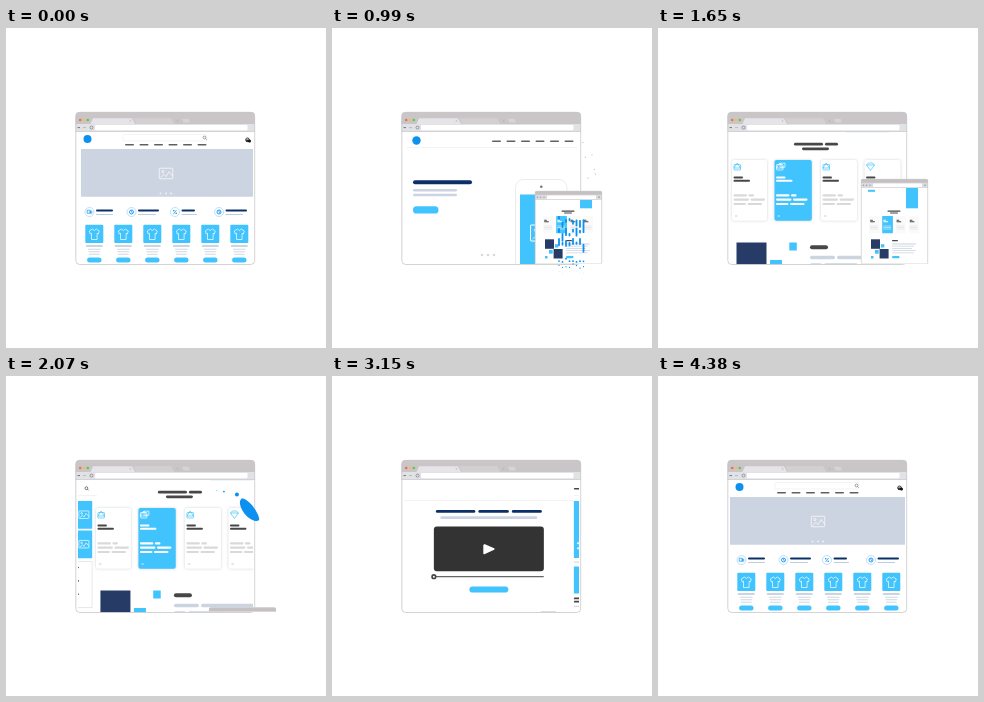
Recreate the animation shown at these times as an HTML page with a canvas. Size 320x320 px, loop 4410 ms.

```html
<!DOCTYPE html>
<html lang="en">
<head>
<meta charset="utf-8">
<title>Website builder</title>
<style>
html, body { margin: 0; width: 100%; height: 100%; overflow: hidden; background: #fff; }
canvas { display: block; width: 320px; height: 320px; }
</style>
</head>
<body>
<canvas id="stage"></canvas>
<script>
const LOOP = 4410, STEP = 30, SHIFT = 170, SCROLL = 132;
const SKY = '#41c3fd', BLUE = '#0c91f0', NAVY = '#0b3068', DARK = '#474747',
      PALE = '#cbd4e0', GREY = '#d9d9d9', INK = '#263c66';
const canvas = document.getElementById('stage');
const c = canvas.getContext('2d');
const scale = window.devicePixelRatio || 1;
canvas.width = canvas.height = 320 * scale;

const progress = (t, start, dur) => Math.min(1, Math.max(0, (t - start) / dur));
const inOut = u => u < .5 ? 4 * u ** 3 : 1 - 4 * (1 - u) ** 3;
const out = u => 1 - (1 - u) ** 3;

function randomizer(seed) {
  return () => (seed = (seed * 16807) % 2147483647) / 2147483647;
}

// Drawing helpers
function box(x, y, w, h, color, r = 0) {
  c.fillStyle = color;
  c.beginPath();
  c.roundRect(x, y, w, h, r);
  c.fill();
}
function frame(x, y, w, h, color, r = 0, width = .7) {
  c.strokeStyle = color;
  c.lineWidth = width;
  c.beginPath();
  c.roundRect(x, y, w, h, r);
  c.stroke();
}
function bar(x1, x2, y, h, color) {
  box(x1, y - h / 2, x2 - x1, h, color, h / 2);
}
function dot(x, y, r, color) {
  c.fillStyle = color;
  c.beginPath();
  c.arc(x, y, r, 0, 7);
  c.fill();
}
function ring(x, y, r, color, width = .7) {
  c.strokeStyle = color;
  c.lineWidth = width;
  c.beginPath();
  c.arc(x, y, r, 0, 7);
  c.stroke();
}
function poly(points, color, fill, width = .7) {
  c.beginPath();
  points.forEach(([x, y]) => c.lineTo(x, y));
  c.fillStyle = c.strokeStyle = color;
  c.lineWidth = width;
  fill ? c.fill() : c.stroke();
}
function clipped(x, y, w, h, draw) {
  if (h <= 0) return;
  c.save();
  c.beginPath();
  c.rect(x, y, w, h);
  c.clip();
  draw();
  c.restore();
}
function moved(dx, dy, draw) {
  c.save();
  c.translate(dx, dy);
  draw();
  c.restore();
}
function picture(x, y, w, h) {
  const l = x - w / 2, b = y + h / 2;
  frame(l, y - h / 2, w, h, '#fff', .5, w > 16 ? 1 : .7);
  ring(l + w * .27, y - h * .18, w * .08, '#fff');
  poly([[l + w * .1, b - h * .12], [l + w * .35, y + h * .08], [l + w * .5, b - h * .2],
        [l + w * .72, y - h * .18], [l + w, y + h * .25]], '#fff');
}
function search(x, y, color) {
  ring(x, y, 1.4, color);
  poly([[x + 1, y + 1], [x + 2.2, y + 2.2]], color);
}
function nav(x, y, count, color = '#5c625f') {
  for (let i = 0; i < count; i++) bar(x + i * 14.5, x + i * 14.5 + 9, y, 1.5, color);
}
const rule = y => box(75, y, 170, .6, '#e8e8e8');

// Pages
function shirt(x, y) {
  poly([[x - 2, y - 5], [x, y - 3.5], [x + 2, y - 5], [x + 5, y - 3], [x + 4, y], [x + 2.8, y - .7],
        [x + 2.8, y + 5.5], [x - 2.8, y + 5.5], [x - 2.8, y - .7], [x - 4, y], [x - 5, y - 3],
        [x - 2, y - 5]], '#fff');
}
function shop(t) {
  dot(81.5, 111, 4, BLUE);
  frame(117, 106.5, 84, 6.5, '#f0f0f0', 1);
  search(198.5, 109.5, '#777');
  nav(119, 116.7, 6);
  ring(241.5, 111.8, 1.8, '#222', .9);
  box(240, 111.5, 3.2, 2.5, '#333', .5);
  dot(243.5, 113, 1.5, '#111');
  const left = t > LOOP / 2 ? 72 : 75;
  box(left, 121, 247 - left, 47.7, PALE);
  picture(160, 145.5, 13.5, 10.5);
  for (const x of [154.5, 160, 165]) dot(x, 165.5, 1, '#edf1f6');

  [[83.5, 107, 107], [125.5, 153, 150], [169, 189, 191], [213, 241, 237]].forEach(([x, end, sub], i) => {
    ring(x, 184, 4.5, '#8fcdf5', .6);
    if (i === 0) {
      frame(x - 2.3, 182.2, 3, 3, BLUE);
      frame(x + .7, 183.2, 1.6, 2, BLUE);
    } else if (i === 2) {
      poly([[x + 1.5, 182], [x - 1.5, 186]], BLUE);
      dot(x - 1.2, 182.7, .8, BLUE);
      dot(x + 1.2, 185.3, .8, BLUE);
    } else {
      ring(x, 184, 2, BLUE, .9);
      poly([[x, 182.5], [x, 184], [x + 1, 185]], BLUE);
    }
    bar(x + 6.5, end, 182.5, 2, NAVY);
    bar(x + 6.5, sub, 186.5, 1.2, '#bdcddd');
  });
  for (let i = 0; i < 6; i++) {
    const x = 88.3 + i * 29;
    box(x - 9, 196.7, 18, 18.3, SKY, 1);
    shirt(x, 206);
    bar(x - 8.5, x + 8.5, 218, 1.3, '#b6c9da');
    [221.3, 223.7, 226.2].forEach((y, n) => bar(x - 6.5 + n / 2, x + 6.5 - n / 2, y, .9, '#cfd8e2'));
    box(x - 7.2, 229.4, 14.4, 5, SKY, 2.5);
  }
}

function landing() {
  dot(84.5, 112.5, 4.2, BLUE);
  nav(160, 113.2, 6);
  rule(119);
  bar(81, 140, 154.2, 4, NAVY);
  bar(81, 125, 162.2, 2.4, PALE);
  bar(81, 125, 167, 2.4, PALE);
  box(81, 178.3, 25.5, 7.2, SKY, 3.6);
  for (const x of [150, 156, 162]) dot(x, 227, 1.3, '#dadada');
  clipped(72, 104, 175, 132, () => {
    frame(183.5, 151.5, 51.5, 100, '#e2e2e2', 8);
    dot(209.3, 158.7, 1.3, '#777');
    box(188, 166.5, 43, 70, SKY);
    picture(209, 205, 21, 16);
  });
}

function card(x, w, active, kind) {
  c.save();
  c.shadowColor = 'rgba(0,0,0,.18)';
  c.shadowBlur = 3 * scale;
  box(x, 132, w, 60.7, active ? SKY : '#fff', 2);
  c.restore();
  const ink = active ? '#fff' : DARK, soft = active ? '#fff' : GREY, icon = active ? '#fff' : SKY;
  const l = x + 2;
  if (kind === 3) {
    poly([[l, 137], [l + 2, 135], [l + 6, 135], [l + 8, 137], [l + 4, 142.5], [l, 137], [l + 8, 137]], icon);
  } else {
    frame(l, 136.5, 6.5, 5.5, icon, .5);
    poly([[l, 140], [l + 3.2, 135], [l + 6.5, 140], [l, 140]], icon);
    if (kind === 1) frame(l + 3.5, 135.2, 5, 4, icon);
  }
  bar(x + 1.5, x + 11, 149.4, 2, ink);
  bar(x + 1.5, x + 18, 152.7, 2, ink);
  [[167.4, 15, 22], [171.6, 17, 33], [176, 14, 30]].forEach(([y, a, b]) => {
    bar(x + 1.5, x + a, y, 2.1, soft);
    bar(x + a + 1.5, x + b, y, 2.1, soft);
  });
  poly([[x + 3, 188], [x + 5.5, 188]], active ? '#fff' : '#bbb');
}
function cards() {
  bar(136, 165, 116.2, 2.8, DARK);
  bar(167, 180, 116.2, 2.8, DARK);
  bar(144, 171, 120.8, 2.8, DARK);
  [[74, 35], [116.5, 37.3], [163, 36], [206.5, 36]].forEach(([x, w], i) => card(x, w, i === 1, i));
  box(78.5, 214.5, 30, 30, INK);
  box(131.3, 214.5, 7.5, 8, SKY);
  box(112, 232, 12, 12, SKY);
  bar(152, 170, 219.3, 4, DARK);
  bar(152, 177, 229.5, 3.4, PALE);
  bar(179, 235, 229.5, 3.4, PALE);
  bar(152, 164, 237, 3.4, PALE);
  bar(166, 200, 237, 3.4, PALE);
}
function scrollPage(t) {
  const y = SCROLL * inOut(progress(t, 1110, 510));
  if (y < SCROLL) moved(0, -y, landing);
  else box(188, 103.8, 43, .6, '#cfeaf3');
  if (y) moved(0, SCROLL - y, cards);
}

function caption(x, y) {
  [[0, 15], [16, 22], [24, 36]].forEach(([a, b]) => bar(x + a, x + b, y, 1.7, DARK));
  [[0, 11], [12, 25]].forEach(([a, b]) => bar(x + a, x + b, y + 3.2, 1.7, DARK));
}
function news() {
  nav(75, 112.7, 4, DARK);
  dot(158.6, 112.7, 5, BLUE);
  search(234.5, 112.2, '#444');
  rule(119);
  box(75, 125, 113.7, 57, SKY);
  picture(133.5, 148, 20.5, 15);
  bar(78, 105, 167.3, 2, '#d9f3ff');
  bar(107, 128, 167.3, 2, '#d9f3ff');
  bar(78, 109, 172.3, 2, '#d9f3ff');
  for (const y of [125, 154.5]) {
    box(191, y, 49.3, 27.8, SKY);
    picture(232, y + 13.7, 10, 7.5);
    bar(194.5, 203, y + 18.5, 1.6, '#fff');
    bar(204.5, 216, y + 18.5, 1.6, '#fff');
    bar(194.5, 211, y + 23, 1.6, '#fff');
  }
  bar(75, 84, 186.2, 1.2, GREY);
  for (let i = 0; i < 3; i++) {
    const x = 75 + i * 39.2;
    box(x, 190.6, 36, 26.8, SKY);
    picture(x + 18, 204, 12.5, 9.5);
    caption(x, 222.4);
    bar(x, x + 14, 230.3, 1.3, GREY);
  }
  frame(192.7, 185.5, 47.5, 46, '#dedede');
  bar(196, 209, 186.2, 1.6, DARK);
  for (let i = 0; i < 3; i++) {
    const y = 191.5 + i * 13.4;
    bar(197.5, 210, y, 1.6, DARK);
    bar(211, 227, y, 1.6, DARK);
    bar(197.5, 220, y + 2.8, 1.6, DARK);
    bar(197.5, 209, y + 6.5, 1, GREY);
  }
}

function video(t) {
  const u = out(progress(t, 3270, 390));
  bar(82, 82 + 29 * u, 116.4, 2, '#1aa0f3');
  bar(238 - 28.5 * u, 238, 114.4, 1.8, '#1aa0f3');
  bar(238 - 18 * u, 238, 117.9, 1.8, '#1aa0f3');
  rule(124.2);
  bar(107, 146.5, 135.4, 2.7, NAVY);
  bar(149.5, 180, 135.4, 2.7, NAVY);
  bar(183, 213, 135.4, 2.7, NAVY);
  bar(111.5, 208.5, 141.6, 2.7, PALE);
  box(105, 150.5, 110, 44.8, '#333', 3);
  c.lineJoin = 'round';
  const play = [[155.2, 168.7], [165, 173], [155.2, 177.5], [155.2, 168.7]];
  poly(play, '#fff', true);
  poly(play, '#fff', false, 1.5);
  bar(105, 215, 200.7, 1.3, '#666');
  const knob = 105 + 13.3 * progress(t, 3300, 450);
  dot(knob, 200.7, 2.6, '#444');
  dot(knob, 200.7, 1, '#fff');
  box(140.5, 210.4, 39, 6.2, SKY, 3.1);
  box(212, 235.2, 15, .8, '#d5d2d3');
}

// Window chrome
function browser() {
  box(69.5, 84, 179.5, 152.7, '#fff', 4);
  box(69.5, 84, 179.5, 14, '#cac5c6', [4, 4, 0, 0]);
  poly([[84.5, 96], [87, 90.3], [126, 90.3], [129, 96]], '#e6e4e8', true);
  poly([[130, 96], [127.5, 90.3], [165, 90.3], [168.5, 96]], '#d4d0d1', true);
  poly([[177.5, 94.5], [176, 90.7], [182.5, 90.7], [184, 94.5]], '#d8d4d5', true);
  ['#ed6d62', '#f2c251', '#62c35e'].forEach((color, i) => dot(74.2 + i * 3.8, 92, 1.3, color));
  for (const x of [124.5, 171.5]) {
    poly([[x - .8, 92], [x + .8, 93.6]], '#aaa', false, .5);
    poly([[x + .8, 92], [x - .8, 93.6]], '#aaa', false, .5);
  }
  box(69.5, 96, 179.5, 7.7, '#e1e2e5');
  box(89, 97, 152.5, 5.3, '#fff', 1);
  poly([[74, 99.6], [71.5, 99.6]], '#777', false, 1);
  poly([[77, 99.6], [80, 99.6]], '#bbb', false, 1);
  ring(85.5, 99.6, 1.5, '#778');
  box(69.5, 103.3, 179.5, .8, '#cdcdcf');
}
function miniWindow(x, w, top, draw) {
  if (top > 235.8) return;
  clipped(x - 1, top - 1, w + 2, 237 - top, () => {
    box(x, top, w, 240 - top, '#fff', 1.5);
    box(x, top, w, 4, '#c5c0c1', [1.5, 1.5, 0, 0]);
    box(x, top + 3.7, w, 5.3, '#dbdbde');
    box(x + 12, top + 4.5, w - 18, 3.5, '#fff', .5);
    [2.5, 5.5, 9].forEach(dx => dot(x + dx, top + 6.2, .7, '#99a'));
    dot(x + w - 3, top + 6.2, .8, '#99a');
    clipped(x, top + 9, w, 227 - top, draw);
    frame(x + .3, top + .3, w - .6, 235.7 - top, '#c9c9cb', 1.5);
  });
}
function miniCards() {
  box(210, 161.8, 7, 2, SKY);
  box(248, 155, 12, 25.3, SKY);
  bar(229.5, 242.5, 183.2, 1.2, DARK);
  bar(232, 240, 184.9, 1, DARK);
  for (let i = 0; i < 4; i++) {
    const x = 211 + i * 13.2, on = i === 1;
    box(x, 188, 10.7, 17.3, on ? SKY : '#fafafa', .5);
    bar(x + 1, x + 4, 192.3, .9, on ? '#fff' : DARK);
    bar(x + 1, x + 6, 193.8, .9, on ? '#fff' : DARK);
    for (const y of [198, 199.5, 201]) bar(x + 1, x + 9, y, .6, on ? '#fff' : GREY);
  }
  box(213, 211.3, 9, 9.5, INK);
  box(221.6, 221, 9, 9.5, INK);
  box(223, 216.2, 3.3, 3.3, SKY);
  box(217, 222, 3.7, 3.7, SKY);
  box(213, 228, 2.5, 2.5, SKY);
  bar(234, 240, 212.7, 1.3, DARK);
  for (let i = 0; i < 5; i++) bar(234, 258 - (i % 3) * 2, 216 + i * 2.2, .8, PALE);
  box(234, 228, 7.5, 2.2, SKY, 1);
}
function miniNews() {
  box(212.3, 170, 34.7, 17, SKY);
  caption(212, 190);
  bar(212, 225, 197, 1, GREY);
  box(212.3, 200, 34.7, 26, SKY);
  picture(229.5, 213, 12.5, 9.5);
  caption(212, 228.6);
}

// Paint effects
function burst(t, start, dur, x, y, reach, count, seed) {
  const u = progress(t, start, dur);
  if (u <= 0 || u >= 1) return;
  const rnd = randomizer(seed);
  for (let i = 0; i < count; i++) {
    const a = rnd() * 6.283, d = reach * (.15 + .85 * rnd()) * out(u), r = .6 + 1.5 * rnd();
    dot(x + d * Math.cos(a), y + d * Math.sin(a) * .8 + 6 * u * u, r * (1 - u * u), BLUE);
  }
}
function drips(t) {
  const u = progress(t, 810, 330);
  if (u <= 0 || u >= 1) return;
  const rnd = randomizer(77), grow = Math.sin(u * Math.PI);
  for (let i = 0; i < 8; i++) {
    const x = 227 + i * 3.5;
    for (let k = 0; k < 3; k++) {
      const y = 188 + k * 11 + rnd() * 6 + 10 * (u - .55), h = (3 + 6 * rnd()) * grow;
      box(x - .9, y, 1.8, h, BLUE, .9);
    }
    for (let k = 0; k < 3; k++) {
      dot(x, 230 + k * 6 + rnd() * 5 + 10 * (u - .55), (.9 - k * .25) * grow, k < 2 ? BLUE : '#a9dcf8');
    }
  }
  for (let i = 0; i < 6; i++) dot(246 + rnd() * 22, 114 + rnd() * 42, .7 * grow, '#b5cedb');
}
function flyingDrop(t) {
  const u = progress(t, 1962, 400);
  if (u <= 0 || u >= 1) return;
  const v = 1 - u;
  const x = v * v * 264 + 2 * u * v * 230 + u * u * 158.6;
  const y = v * v * 165 + 2 * u * v * 95 + u * u * 112.7;
  const angle = Math.atan2(v * -70 + u * 17.7, v * -34 + u * -71.4);
  const size = Math.min(1, u * 5);
  c.save();
  c.translate(x, y);
  c.rotate(angle);
  c.scale(size, size);
  c.fillStyle = BLUE;
  c.beginPath();
  c.moveTo(13, 2);
  c.bezierCurveTo(12, 6, -4, 7, -14, 1);
  c.bezierCurveTo(-17, -2, -8, -7, 0, -6);
  c.bezierCurveTo(8, -5, 13, -2, 13, 2);
  c.fill();
  c.restore();
  dot(x - 12, y - 15, 2 * size, BLUE);
  dot(x - 25, y - 18, .9 * size, BLUE);
  dot(x - 32, y - 19, .7 * size, '#7fd0f8');
}

// Each page is pushed out to the right by the next one
const pages = [shop, scrollPage, news, video, shop];
const pushes = [[210, 360], [1967, 360], [2850, 360], [3930, 420]];

function draw(t) {
  c.setTransform(scale, 0, 0, scale, 0, 0);
  c.fillStyle = '#fff';
  c.fillRect(0, 0, 320, 320);
  browser();
  clipped(72, 104.2, 175, 132, () => {
    pages.forEach((page, i) => {
      const enter = i ? inOut(progress(t, ...pushes[i - 1])) : 1;
      const leave = i < pushes.length ? inOut(progress(t, ...pushes[i])) : 0;
      if (enter > 0 && leave < 1) moved(SHIFT * (enter - 1 + leave), 0, () => page(t));
    });
  });
  frame(69.8, 84.3, 178.9, 152.2, '#c8c8ca', 4, .8);
  miniWindow(203, 67, 236 - 85 * (out(progress(t, 750, 500)) - progress(t, 1740, 336) ** 3), miniCards);
  miniWindow(211, 37, 236 - 65 * (out(progress(t, 2300, 260)) - progress(t, 2760, 240) ** 3), miniNews);
  burst(t, 30, 480, 81.5, 111, 54, 22, 11);
  drips(t);
  flyingDrop(t);
  burst(t, 2400, 330, 216, 135, 24, 24, 29);
}

const begin = performance.now();
function tick() {
  const t = (performance.now() - begin) % LOOP;
  draw(Math.floor(t / STEP) * STEP);
  requestAnimationFrame(tick);
}
tick();
</script>
</body>
</html>
```
